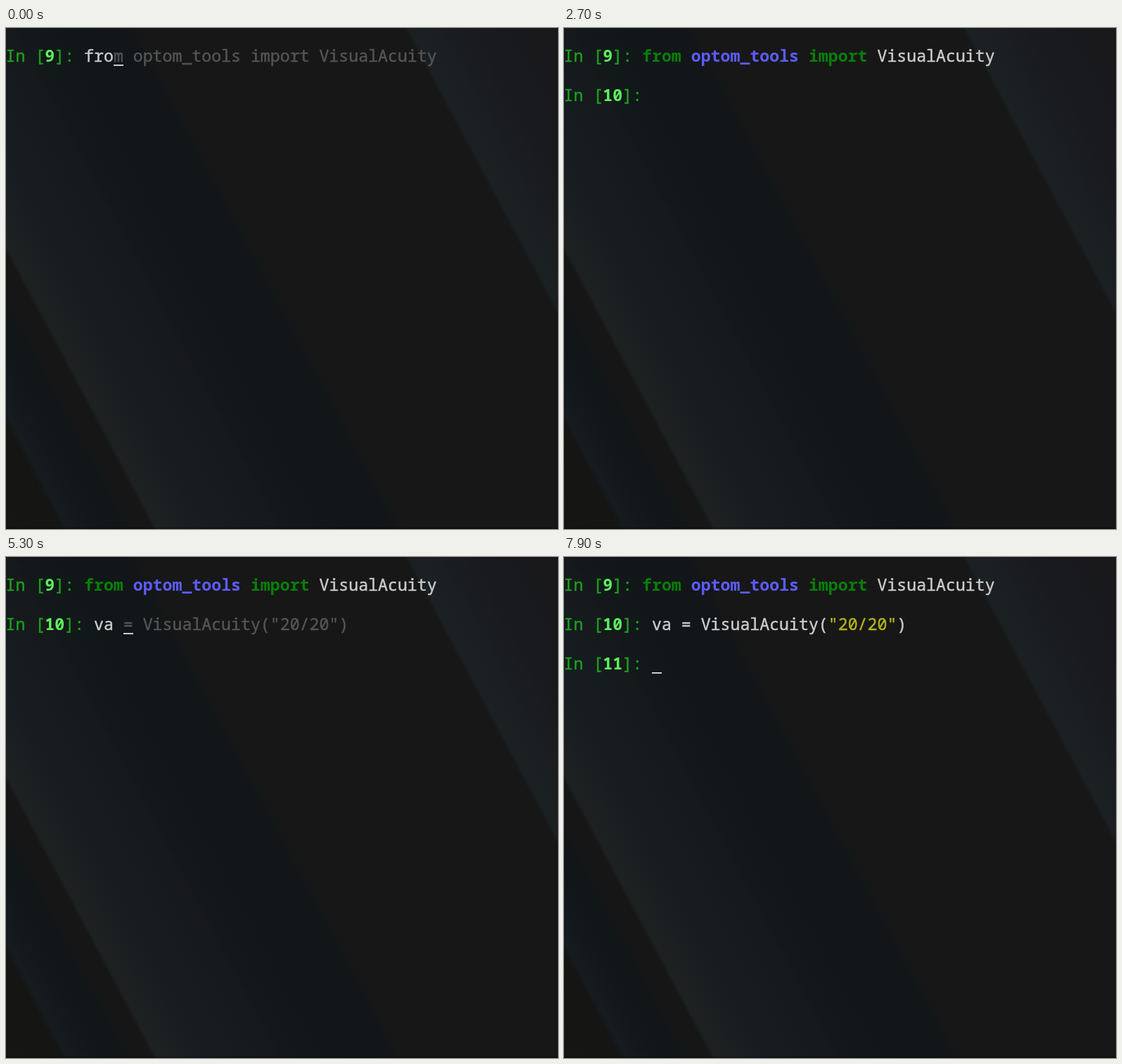
An HTML page that plays this animation: 785 by 713 pixels, repeating every 8000 ms.

```html
<!DOCTYPE html>
<html lang="en">
<meta charset="utf-8">
<title>Interactive session</title>
<style>
html, body { margin: 0; width: 100%; height: 100%; overflow: hidden; background: #171717; }
#stage {
  position: relative; width: 785px; height: 713px; overflow: hidden;
  background:
    linear-gradient(#0005, #0005) 0 711px / 100% 2px no-repeat,
    linear-gradient(62deg,
      #161614 0, #151514 70px, #151c1f 79px, #12181b 105px, #111618 140px,
      #161617 165px, #161616 185px, #1e2122 190px, #1d2021 207px, #181d21 245px,
      #151b1f 290px, #17191b 341px, #13181b 352px, #111619 420px, #121618 486px,
      #171717 504px, #171717 835px, #1b2022 840px, #1b1f21 875px,
      #191a1d 920px, #18181b 1028px);
}
pre {
  position: absolute; left: -.4px; top: 25px; margin: 0; color: #ccc;
  font: 23.23px/28px "Noto Sans Mono", monospace; font-variant-ligatures: none;
  -webkit-text-stroke: .45px;
}
.prompt { color: #1ca01c; }
.prompt b { color: #5cf45c; }
.key { color: #087f08; font-weight: 700; }
.module { color: #5c5cff; font-weight: 700; }
.string { color: #b5b41c; }
.hint { color: #555; }
.match { display: inline-block; background: #98c6b8; box-shadow: 0 1px #98c6b8; color: #171717; }
.prompt b, .key, .module { -webkit-text-stroke: 0; }
#cursor { position: absolute; width: 14px; height: 2px; background: #ccc; }
</style>
<div id="stage"><pre id="text"></pre><div id="cursor"></div></div>
<script>
const CHAR = 13.94, LINE = 28, BLINK = 550, LOOP = 8000;
const text = document.getElementById('text');
const cursor = document.getElementById('cursor');

const span = (kind, s) => `<span class="${kind}">${s}</span>`;
const prompt = n => span('prompt', `In [<b>${n}</b>]: `);
const call = (kind = 'plain') =>
  `va = VisualAcuity${span(kind, '(')}${span('string', '"20/20"')}${span(kind, ')')}`;

const from = span('key', 'from');
const importTail = ' optom_tools import VisualAcuity';
const importLine = `${from} ${span('module', 'optom_tools')} ${span('key', 'import')} VisualAcuity`;
const first = prompt(9);
const second = `${first}${importLine}\n\n${prompt(10)}`;
const third = `${second}${call()}\n\n${prompt(11)}`;

// Each step: start time, screen content, cursor row and column
const steps = [
  [0, first + 'fro' + span('hint', 'm' + importTail), 0, 11],
  [100, first + from + span('hint', importTail), 0, 12],
  [200, first + from + ' ' + span('hint', importTail.slice(1)), 0, 13],
  [800, first + importLine, 0, 44],
  [1000, second, 2, 9],
  [3800, second + 'v' + span('hint', 'a'), 2, 10],
  [4000, second + 'va', 2, 11],
  [5000, second + 'va ' + span('hint', '= VisualAcuity("20/20")'), 2, 12],
  [5700, second + call('match'), 2, 35],
  [6300, third, 4, 9],
];

let shown;
function draw(now) {
  const t = Math.floor(now % LOOP / 100) * 100;
  const step = steps.findLast(s => s[0] <= t);
  const [start, screen, row, col] = step;
  if (step !== shown) {
    text.innerHTML = screen;
    cursor.style.left = col * CHAR - .4 + 'px';
    cursor.style.top = 52 + row * LINE + 'px';
    shown = step;
  }
  // The blink restarts with every key press
  cursor.style.opacity = Math.floor((t - start) / BLINK) % 2 ? 0 : 1;
  requestAnimationFrame(() => draw(performance.now()));
}
draw(0);
</script>
</html>
```
